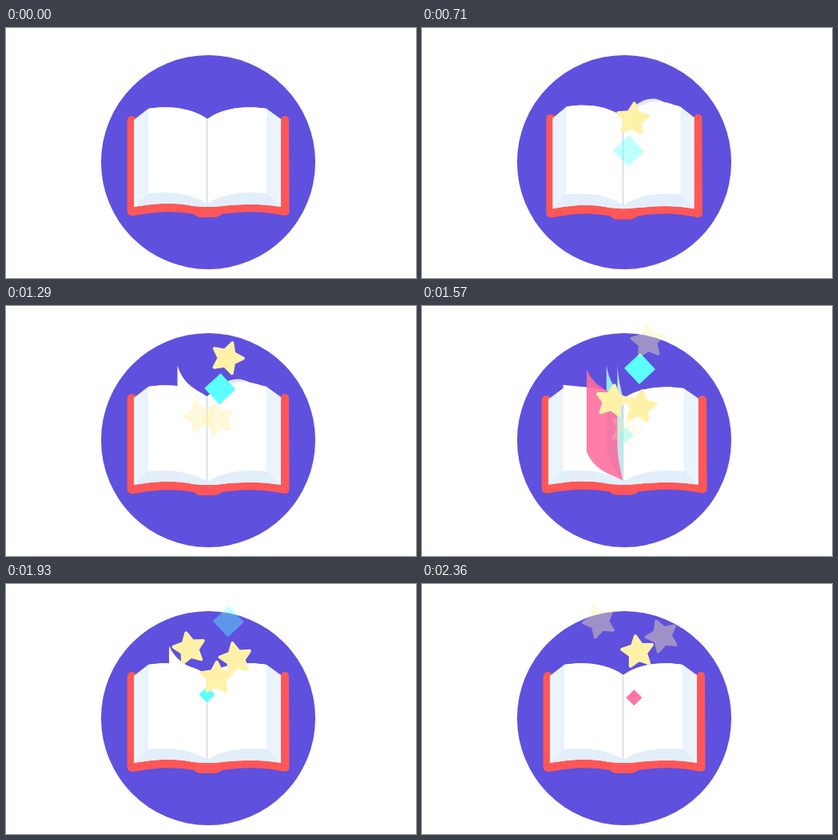
An HTML page for the animation above (2.43 s loop, 513x313 px).

```html
<!DOCTYPE html>
<html lang="en">
<head>
<meta charset="utf-8">
<title>Magic book</title>
<style>
  html, body { margin: 0; width: 100%; height: 100%; overflow: hidden; background: #fff; }
  svg { display: block; width: 100vw; height: 100vh; }
</style>
</head>
<body>
<svg viewBox="0 0 513 313">
  <circle cx="253" cy="168" r="134" fill="#5f50de"/>
  <g id="book">
    <path fill="#ff5757" d="M151.7 116Q151.7 110.3 157.5 110.3Q163 110.3 163 116H343.5Q343.5 110.3 349 110.3Q354 110.3 354 116L354.5 229Q354.5 236 347 234.5C312 228 295 230 270 233Q266 237 260 237H244Q239 237 235 233C210 229 192 229 159 235Q151.7 235 151.7 229Z"/>
    <path fill="#ebf4fd" d="M160 115L178 101C205 97 232 100 252 114C271 100 299 97 326 101L344 114V224C315 219 290 221 270 223Q252 225 235 223C210 218 190 219 160 224Z"/>
    <path fill="#e2effa" d="M178 206L160 224C190 219 210 218 235 223Q252 225 270 223C290 221 315 219 344 224L326 206Z"/>
    <path fill="#fff" d="M178 101C205 97 232 100 252 114C271 100 299 97 326 101V207C299 204 271 207 252 220C232 207 205 204 178 207Z"/>
    <g id="leaves"></g>
    <path stroke="#c8dce9" stroke-width="1.5" d="M251.5 114V220"/>
  </g>
  <g id="sparks"></g>
</svg>
<script>
const LOOP = 2430, STEPS = 34;
const SPINE = 251.5, LEAF_WIDTH = 74, LEAF_HEIGHT = 105.5;
const YELLOW = '#fff2a8', CYAN = '#5cffff', PINK = '#ff74a4';

const byId = id => document.getElementById(id);
const clamp = v => Math.min(1, Math.max(0, v));
const mix = (a, b, t) => a + (b - a) * t;
const linear = t => t;
const easeInOut = t => (1 - Math.cos(Math.PI * t)) / 2;

// Ramps up after `from` and down before `to`.
const pulse = (v, from, to, ramp) => clamp(Math.min(v - from, to - v) / ramp);
// Half a sine wave that starts at `from`.
const swell = (v, from, length) => Math.sin(Math.PI * clamp((v - from) / length));

function addPath(parent, attrs = {}) {
  const node = document.createElementNS('http://www.w3.org/2000/svg', 'path');
  for (const name in attrs) node.setAttribute(name, attrs[name]);
  return byId(parent).appendChild(node);
}

// Stars and diamonds rising out of the book
const sparks = [];
function addSpark(attrs, motion) {
  const node = addPath('sparks', attrs);
  sparks.push({ node, move: motion.show, ease: linear, tilt: 0, spin: 0, ...motion });
}

function addStar(motion) {
  const points = Array.from({ length: 10 }, (_, i) => {
    const r = i % 2 ? 10.2 : 20, a = i * Math.PI / 5;
    return `${r * Math.sin(a)} ${-r * Math.cos(a)}`;
  });
  addSpark({
    d: `M${points.join('L')}Z`, fill: YELLOW, stroke: YELLOW,
    'stroke-width': 4, 'stroke-linejoin': 'round'
  }, { move: [16, 35], ease: easeInOut, tilt: 62, spin: -234, ...motion });
}

function addDiamond(r, fill, motion) {
  addSpark({ d: `M0 ${-r}L${r} 0L0 ${r}L${-r} 0Z`, fill }, motion);
}

addDiamond(19.5, CYAN, { show: [8, 29], from: [256.2, 166.6], to: [280.6, 34.4], tilt: 2 });
addDiamond(10, CYAN, { show: [20, 32], from: [256.4, 170.7], to: [248, 115.5] });
addDiamond(10, PINK, { show: [27, 46], from: [260.5, 168.7], to: [275.7, 85] });
addStar({ show: [5, 24], move: [8, 24], from: [263, 117], to: [283, 42], tilt: 9, spin: -90 });
addStar({ show: [16, 35], from: [242.6, 141], to: [221.4, 44.5] });
addStar({ show: [16, 35], from: [264, 144.5], to: [301.5, 63] });
addStar({ show: [21, 40], from: [251.7, 176], to: [270.5, 82.5], tilt: 75 });

function drawSpark({ node, show, move, from, to, ease, tilt, spin }, step) {
  const t = ease(clamp((step - move[0]) / (move[1] - move[0])));
  const [x, y] = from.map((v, i) => mix(v, to[i], t));
  node.setAttribute('transform', `translate(${x} ${y}) rotate(${tilt + spin * t})`);
  node.setAttribute('opacity', pulse(step, ...show, 5));
}

// Leaves turning right to left; they start white, show a colour and land white.
const LEAVES = [
  { rgb: [148, 230, 244], alpha: 1, lag: 1 },
  { rgb: [255, 107, 157], alpha: .88, lag: 0 },
  { rgb: [193, 232, 239], alpha: 1, lag: 1.5, hovers: true }
];
const turns = [8, 16].flatMap(start =>
  LEAVES.map(leaf => ({ ...leaf, start, node: addPath('leaves') })));

function leafPath(angle) {
  const c = Math.cos(angle), s = Math.sin(angle), h = LEAF_HEIGHT;
  const x = f => SPINE + c * LEAF_WIDTH * f;
  const near = x(.28), far = x(c < 0 ? .63 + .17 * s : .63), edge = x(1);
  const y1 = 100 + 2 * s - 8 * s * c;
  const y2 = 97 - 5 * s - 20 * s * c;
  const tip = 100.5 - 30 * (c > 0 ? (1 - c) ** 1.5 : s);
  return `M${SPINE} 113.5C${near} ${y1} ${far} ${y2} ${edge} ${tip}V${tip + h}` +
    `C${far} ${y2 + h} ${near} ${y1 + h} ${SPINE} ${113.5 + h}Z`;
}

function drawLeaf({ node, start, rgb, alpha, lag, hovers }, step) {
  const u = step - start;
  const t = Math.min((u - lag) / 8.5, hovers ? .5 + u ** 3 / 6000 : 1);
  const visible = t > 0 && t < 1;
  node.setAttribute('visibility', visible ? 'visible' : 'hidden');
  if (!visible) return;
  const tint = pulse(u, 3, 9, 2);
  const plain = u < 5 ? .85 : 1;
  node.setAttribute('d', leafPath(Math.PI * t));
  node.setAttribute('fill', `rgb(${rgb.map(v => Math.round(mix(255, v, tint)))})`);
  node.setAttribute('fill-opacity', mix(plain, alpha, tint));
}

// The book stretches up, then bounces out wide twice.
function drawBook(step) {
  const stretch = swell(step, 3, 8);
  const bounce = swell(step, 10.5, 4.5), echo = swell(step, 19, 6);
  const wide = 1 - .096 * stretch + .038 * bounce + .02 * echo;
  const drop = .8 * echo - bounce;
  byId('book').setAttribute('transform',
    `translate(253 ${168 + drop}) scale(${wide} ${1 / wide}) translate(-253 -168)`);
}

function draw(time) {
  const step = Math.floor((time % LOOP + 5) / (LOOP / STEPS)) % STEPS;
  drawBook(step);
  turns.forEach(turn => drawLeaf(turn, step));
  sparks.forEach(spark => drawSpark(spark, step));
}

const begin = performance.now();
function tick() {
  draw(performance.now() - begin);
  requestAnimationFrame(tick);
}
tick();
</script>
</body>
</html>
```
